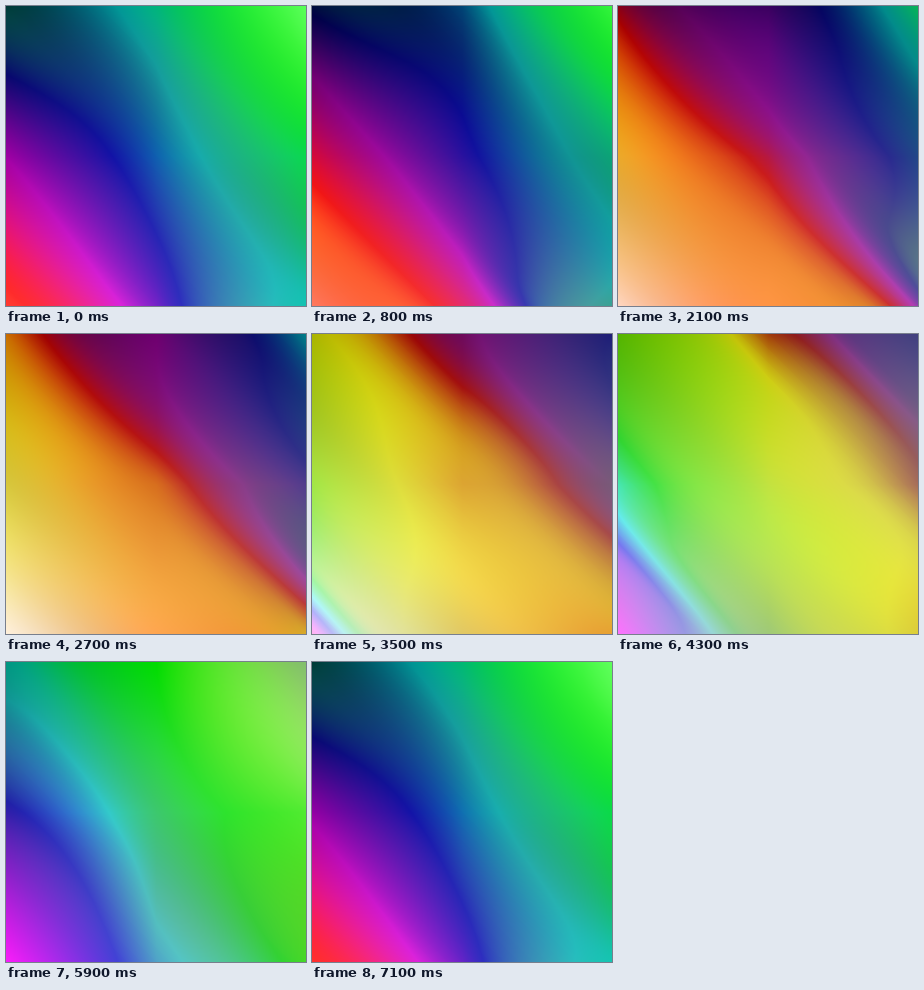
An HTML page with a canvas for the animation above (7200 ms loop, 300 by 300 pixels).

```html
<!DOCTYPE html>
<html lang="en">
<head>
<meta charset="utf-8">
<title>Drifting spectrum</title>
<style>
  html, body { margin: 0; width: 100%; height: 100%; overflow: hidden; }
  canvas { display: block; width: 100vw; height: 100vh; }
</style>
</head>
<body>
<canvas id="stage" width="300" height="300"></canvas>
<script>
const SIZE = 300, HALF = SIZE / 2, LOOP = 7200, STEP = 100;
const DRIFT = 0.535; // degrees of phase per pixel along x - y
const HUE_LEAD = 225; // typical hue at phase zero on the main diagonal
const PHASES = 720;
const KEYS = [0, 75, 135, 175, 250, 295];

// Colour cycles of a 3 x 3 mesh, row by row, one colour per key phase.
const CYCLES = [
  '003a36 460046 c86e00 aab400 00b400 009682',
  '00b47c 080050 6e006e 6e0a5a 78d20a 00dc00',
  '5aff5a 14e128 008088 1e1e78 5a5a8c 82be6e',
  'a000a3 ff7318 d7c83c a0e646 4678e6 321eaa',
  '0f5faf 821496 d76e1e dca532 6ee646 3cc86e',
  '0ad750 0f7882 503c8c 785a78 b9d75a 50eb32',
  'ff3c32 ffaf96 fff0dc ffb4f0 dc3cff fa1efa',
  '7823c8 ff823a ffa550 e1c864 82be96 4fa0c8',
  '14c3b2 5a8c82 d7aa28 e6a032 a0d23c 46d728'
];

const mod = (n, m) => ((n % m) + m) % m;

// Hex colour to hue, lowest and highest channel; the hue is unwound towards `near`.
function split(hex, near) {
  const [r, g, b] = [0, 2, 4].map(i => parseInt(hex.slice(i, i + 2), 16));
  const lo = Math.min(r, g, b), hi = Math.max(r, g, b), range = hi - lo || 1;
  const sector = hi === r ? (g - b) / range
    : hi === g ? 2 + (b - r) / range : 4 + (r - g) / range;
  const hue = sector * 60;
  return [hue + 360 * Math.round((near - hue) / 360), lo, hi];
}

// Monotone curve through the key colours, sampled once per phase.
function makeCycle(text, index) {
  const lead = HUE_LEAD - (index % 3 - Math.floor(index / 3)) * HALF * DRIFT;
  const colors = text.split(' ').map((hex, i) => split(hex, KEYS[i] + lead));
  const n = KEYS.length;
  const key = i => KEYS[mod(i, n)] + 360 * Math.floor(i / n);
  const val = (i, c) => colors[mod(i, n)][c] + (c ? 0 : 360 * Math.floor(i / n));
  const rise = (i, c) => (val(i + 1, c) - val(i, c)) / (key(i + 1) - key(i));
  const slope = (i, c) => {
    const a = rise(i - 1, c), b = rise(i, c);
    return a * b > 0 ? 2 * a * b / (a + b) : 0;
  };
  const table = new Float32Array(PHASES * 3);
  for (let p = 0; p < PHASES; p++) {
    const deg = p * 360 / PHASES;
    let i = n - 1;
    while (KEYS[i] > deg) i--;
    const span = key(i + 1) - key(i), s = (deg - key(i)) / span;
    const s2 = s * s, s3 = s2 * s;
    for (let c = 0; c < 3; c++) {
      table[p * 3 + c] = (2 * s3 - 3 * s2 + 1) * val(i, c) + (3 * s2 - 2 * s3) * val(i + 1, c)
        + span * ((s3 - 2 * s2 + s) * slope(i, c) + (s3 - s2) * slope(i + 1, c));
    }
  }
  return table;
}

const cycles = CYCLES.map(makeCycle);
const ctx = document.getElementById('stage').getContext('2d');
const image = ctx.createImageData(SIZE, SIZE);

// Share of a channel at a hue, where `turn` is its offset in sixths of the wheel.
const share = (hue, turn) =>
  Math.max(0, Math.min(1, Math.abs(mod(hue / 60 + turn, 6) - 3) - 1));

function draw(deg) {
  const px = image.data, unit = PHASES / 360;
  let o = 0;
  for (let y = 0; y < SIZE; y++) {
    const row = y < HALF ? 0 : 1, fy = y / HALF - row;
    for (let x = 0; x < SIZE; x++) {
      const col = x < HALF ? 0 : 1, fx = x / HALF - col;
      let hue = 0, lo = 0, hi = 0;
      for (let k = 0; k < 4; k++) {
        const i = k & 1, j = k >> 1;
        const w = (i ? fx : 1 - fx) * (j ? fy : 1 - fy);
        const dist = x - y - (col + i - row - j) * HALF;
        const phase = (deg - dist * DRIFT) * unit;
        const p = Math.floor(mod(phase, PHASES)) * 3;
        const table = cycles[(row + j) * 3 + col + i];
        hue += w * (table[p] + 360 * Math.floor(phase / PHASES));
        lo += w * table[p + 1];
        hi += w * table[p + 2];
      }
      px[o++] = lo + (hi - lo) * share(hue, 0);
      px[o++] = lo + (hi - lo) * share(hue, 4);
      px[o++] = lo + (hi - lo) * share(hue, 2);
      px[o++] = 255;
    }
  }
  ctx.putImageData(image, 0, 0);
}

let shown = -1;
function tick() {
  const step = Math.floor(performance.now() % LOOP / STEP);
  if (step !== shown) {
    shown = step;
    draw(step * STEP / LOOP * 360);
  }
  requestAnimationFrame(tick);
}
tick();
</script>
</body>
</html>
```
